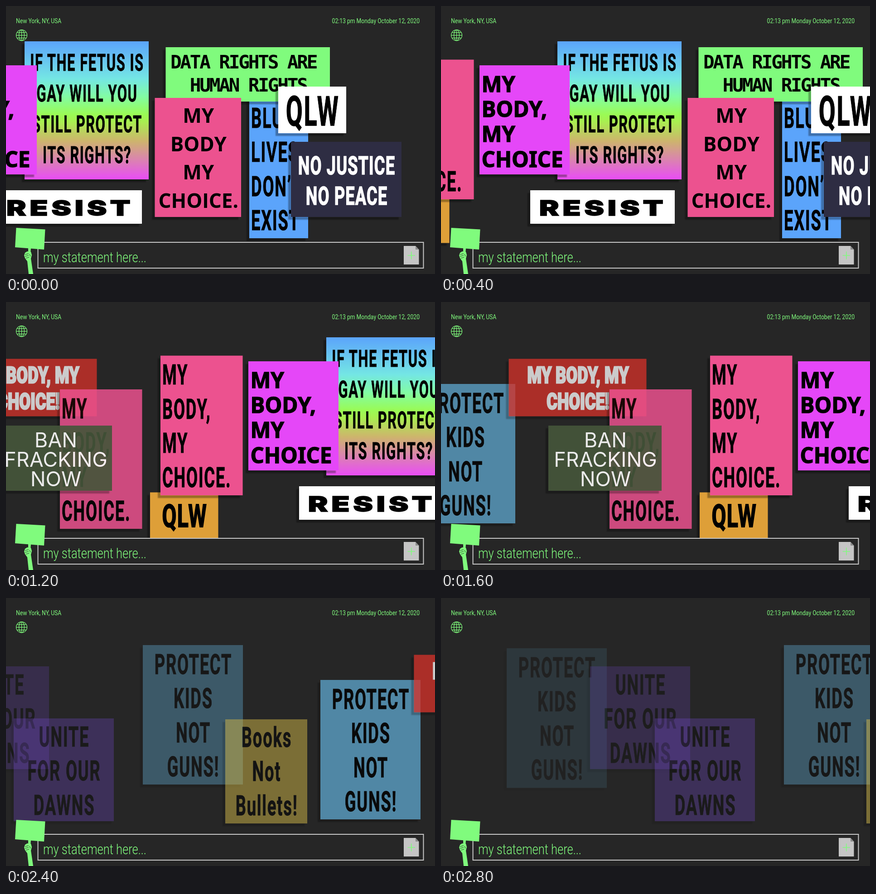
An HTML page for the animation above (3.2 s loop, 947 by 592 pixels).

```html
<!DOCTYPE html>
<html lang="en">
<head>
<meta charset="utf-8">
<title>Statement wall</title>
<style>
  html, body { margin: 0; width: 100%; height: 100%; overflow: hidden; background: #262626; }
  svg { display: block; width: 100%; height: 100%; }
  text { white-space: pre; }
  .din, .gothic { font-family: Roboto, sans-serif; font-weight: 700; letter-spacing: .05em; stroke-width: .015em; }
  .gothic { letter-spacing: .03em; stroke-width: .03em; }
  .poster { font-family: Roboto, sans-serif; font-weight: 900; stroke-width: .06em; }
  .open { font-family: "Open Sans", sans-serif; font-weight: 700; stroke-width: 0; }
  .noto { font-family: "Noto Sans", sans-serif; font-weight: 700; stroke-width: .03em; }
  .wide { font-family: Inter, sans-serif; font-weight: 900; letter-spacing: 5.5px; stroke-width: .03em; }
  .tech { font-family: "DejaVu Sans Mono", monospace; font-weight: 700; letter-spacing: -3.2px; stroke-width: 0; }
  .plain { font-family: Inter, sans-serif; stroke-width: 0; }
  .ui { font-family: Roboto, sans-serif; font-weight: 400; fill: #80fb7d; }
  .ui.light { font-weight: 300; }
  .green { fill: #80fb7d; }
  .line { fill: none; stroke: #80fb7d; }
  #wall { animation: scroll 3200ms step-end infinite; }
  @keyframes scroll {
    0% { transform: translateX(0); }
    12.5% { transform: translateX(216px); }
    25% { transform: translateX(436px); }
    37.5% { transform: translateX(666px); }
    50% { transform: translateX(919px); }
    62.5% { transform: translateX(1244px); }
    75% { transform: translateX(1670px); }
    87.5% { transform: translateX(2125px); }
  }
</style>
</head>
<body>
<svg viewBox="0 0 947 592">
  <defs>
    <linearGradient id="rainbow" x2="0" y2="1">
      <stop offset="0" stop-color="#5ba4fb"/>
      <stop offset=".27" stop-color="#74e6e4"/>
      <stop offset=".4" stop-color="#82fca4"/>
      <stop offset=".53" stop-color="#9afb55"/>
      <stop offset=".58" stop-color="#a8f050"/>
      <stop offset=".72" stop-color="#cdb56c"/>
      <stop offset=".85" stop-color="#da86ac"/>
      <stop offset="1" stop-color="#e94df6"/>
    </linearGradient>
    <filter id="soft" x="-10%" y="-10%" width="120%" height="120%">
      <feGaussianBlur stdDeviation="1"/>
    </filter>
  </defs>
  <rect width="947" height="592" fill="#262626"/>
  <g id="wall"></g>

  <text class="ui" font-size="15" transform="translate(22 37.5) scale(.815 1)">New York, NY, USA</text>
  <text class="ui" font-size="15" text-anchor="end" transform="translate(913 37.5) scale(.815 1)">02:13 pm Monday October 12, 2020</text>
  <g class="line" stroke-width="1.2" transform="translate(34.5 64.6)">
    <circle r="12"/>
    <ellipse rx="6" ry="12"/>
    <path d="M0-12V12M-12 0H12M-10.4-6H10.4M-10.4 6H10.4"/>
  </g>

  <rect x="70.5" y="522" width="851" height="57" fill="#262626" stroke="#c8c8c8" stroke-width="2"/>
  <text class="ui light" font-size="30.5" transform="translate(82 566) scale(.835 1)">my statement here...</text>
  <path d="M878 530H904L911.5 538V571H878Z" fill="#c5c5c5"/>
  <path d="M904 530V538H911.5Z" fill="#8b8b8b"/>
  <path class="line" stroke-width="1.6" d="M886.5 551H903M894.8 542.5V559.5"/>

  <g class="green">
    <path d="M22.5 490L86.500 493.500L84 538L20 533Z"/>
    <path d="M49 535H55L54 546H49Z"/>
    <path d="M42 545L47 542L55 543L57 550L55 558L60 592H50L47 564L42 557L40 551Z"/>
  </g>
  <path d="M42 549L50 547M42 553L50 551M44 557L51 555M52 548L54 553" stroke="#262626" stroke-width=".9" fill="none"/>
</svg>
<script>
const SVG = "http://www.w3.org/2000/svg";
const wall = document.getElementById("wall");

// Horizontal proportion of each typeface
const proportion = { din: .59, gothic: .66, poster: .72, wide: 1.4 };

function add(parent, tag, attrs, content = "") {
  const node = document.createElementNS(SVG, tag);
  for (const key in attrs) node.setAttribute(key, attrs[key]);
  node.textContent = content;
  parent.append(node);
  return node;
}

function card([x, y, w, h], fill, lines, style) {
  const { face = "din", size = 61.5, top = 63.5, pitch = 75.6, left, ink = "#000", alpha = 1 } = style;
  const group = add(wall, "g", { transform: `translate(${x} ${y})`, opacity: alpha });
  add(group, "path", {
    d: `M-6 6H0V${h}H${w - 6}V${h + 6}H-6Z`, fill: "#000", opacity: .32, filter: "url(#soft)"
  });
  add(group, "rect", { width: w, height: h, fill });
  lines.split("/").forEach((line, i) => add(group, "text", {
    class: face, fill: ink, stroke: ink, "font-size": size,
    "text-anchor": left === undefined ? "middle" : "start",
    transform: `translate(${left ?? w / 2 + 1} ${top + i * pitch}) scale(${proportion[face] || 1} 1)`
  }, line));
}

const pink = "#ec528f", sky = "#5fa9d1", violet = "#764bd0";
const kids = "PROTECT/KIDS/NOT/GUNS!", dawns = "UNITE/FOR OUR/DAWNS";
const choice = "MY/BODY,/MY/CHOICE.";

card([537, 205, 130, 308], "#5ba4fb", "BLUE/LIVES/DON’T/EXIST", { left: 4 });
card([352.5, 91, 362.5, 120], "#80fb7d", "DATA RIGHTS ARE\u00a0/HUMAN RIGHTS",
  { face: "tech", size: 41, top: 47, pitch: 50.5 });
card([328.5, 203, 190.5, 263], pink, "MY/BODY/MY/CHOICE.", { face: "open", size: 44, top: 55, pitch: 62.6 });
card([601, 178, 150, 103], "#fff", "QLW", { size: 91, top: 85.5 });
card([629, 300, 244, 166], "#2e2d43", "NO JUSTICE/NO PEACE",
  { face: "gothic", size: 55, top: 71.5, pitch: 67, ink: "#fff" });

card([41, 78, 274, 305], "url(#rainbow)", "IF THE FETUS IS/GAY WILL YOU/STILL PROTECT/ITS RIGHTS?",
  { size: 52.5, top: 64.5, pitch: 68.3 });
card([-131, 131, 199, 241], "#e547f8", "MY/BODY,/MY/CHOICE", { face: "noto", size: 47.5, top: 59, pitch: 55.2, left: 4.5 });
card([-19, 407, 319, 74], "#fff", "RESIST", { face: "wide", size: 47, top: 55.5 });

card([-348, 420.5, 150.5, 103], "#de9f38", "QLW", { face: "gothic", size: 70, top: 76 });
card([-325, 118.5, 181.5, 308.5], pink, choice, { left: 4 });

card([-976, 181, 221, 308], sky, kids, { alpha: .75 });
card([-769.5, 125.5, 304, 127], "#d5312a", "MY BODY, MY/CHOICE!",
  { face: "poster", size: 50, top: 53, pitch: 58, ink: "#fff", alpha: .76 });
card([-547, 193, 181.5, 308], pink, choice, { left: 4, alpha: .85 });
card([-682, 273, 250, 144], "#46563b", "BAN/FRACKING/NOW",
  { face: "plain", size: 45, top: 48, pitch: 42.8, ink: "#fff", alpha: .91 });

card([-1368, 104, 221, 308], sky, kids, { alpha: .39 });
card([-1186, 268, 181, 230], "#d0b646", "Books/Not/Bullets!", { top: 60.5, alpha: .5 });
card([-1980, 111, 221, 308.5], sky, kids, { alpha: .13 });
card([-1796, 151, 221, 227], violet, dawns, { top: 61.5, alpha: .22 });
card([-1653, 266, 221, 227], violet, dawns, { top: 61.5, alpha: .3 });
</script>
</body>
</html>
```
